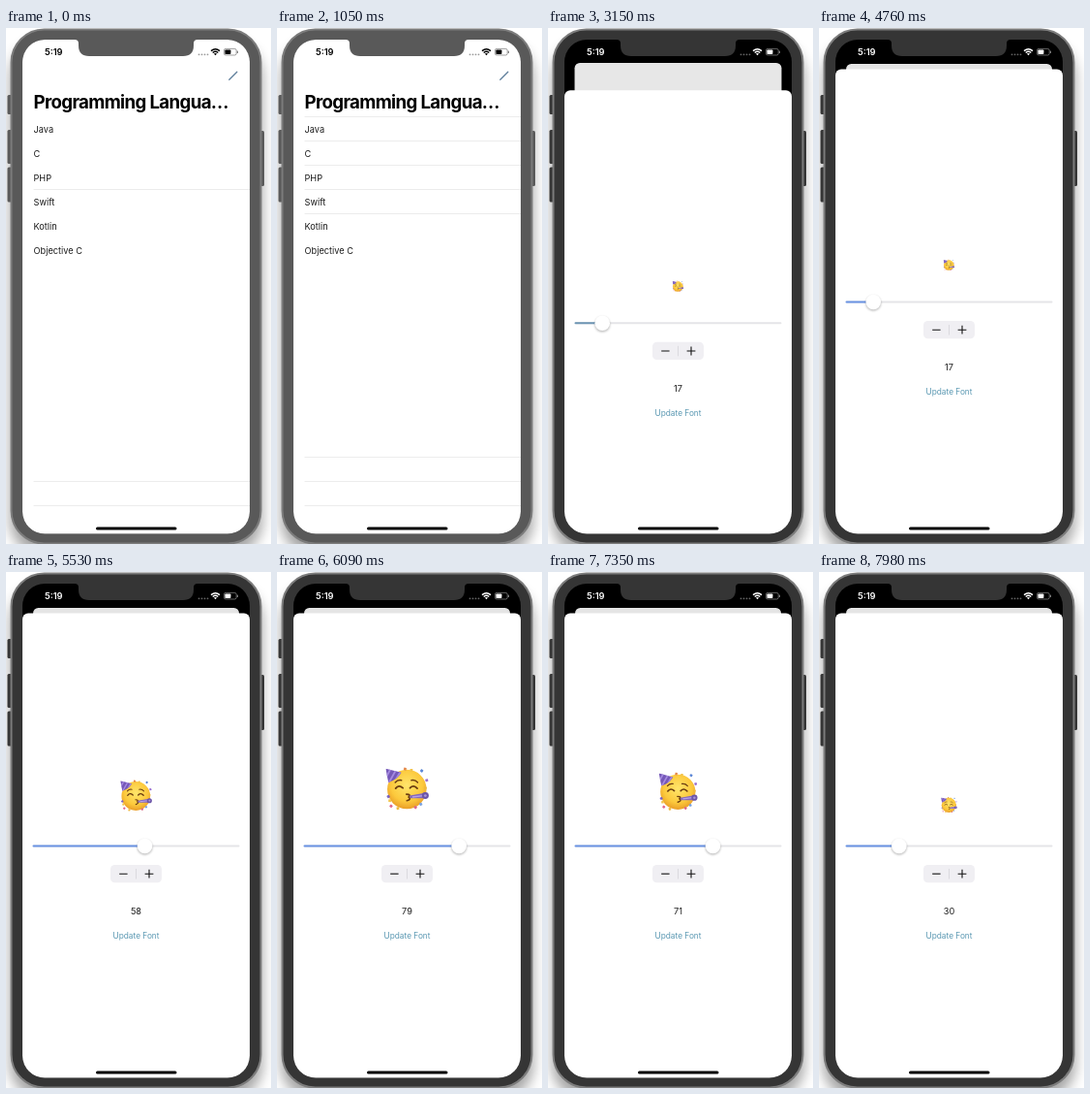
Animation of 274 by 532 pixels, one loop 8000 ms. Source, as an HTML page:

```html
<!DOCTYPE html>
<html lang="en">
<head>
<meta charset="utf-8">
<title>Font size sheet</title>
<style>
  html, body { margin: 0; height: 100%; overflow: hidden; background: #fff; }
  svg { display: block; width: 100vw; height: 100vh; font-family: Inter, Roboto, sans-serif; }
  .row { font-size: 9.2px; fill: #1c1c1c; }
  .title { font-size: 18.7px; font-weight: 700; letter-spacing: -.035em; }
  .clock { font-size: 9.3px; font-weight: 600; }
  .link { font-size: 8.3px; fill: #5a98b2; }
  .mid { text-anchor: middle; }
</style>
</head>
<body>
<svg viewBox="0 0 274 532">
  <defs>
    <clipPath id="screen"><rect x="17" y="12" width="235" height="509.500" rx="23"/></clipPath>
    <clipPath id="hatShape"><path d="M3 5L38 14Q28 30 9 36Z"/></clipPath>
    <radialGradient id="skin" cx=".5" cy=".4" r=".62">
      <stop offset="0" stop-color="#ffe56b"/><stop offset=".65" stop-color="#fcc93c"/><stop offset="1" stop-color="#e89a26"/>
    </radialGradient>
    <filter id="blur" x="-20%" y="-20%" width="140%" height="140%"><feGaussianBlur stdDeviation="7"/></filter>
    <filter id="soft" x="-50%" y="-50%" width="200%" height="200%"><feGaussianBlur stdDeviation="1.1"/></filter>
  </defs>

  <rect width="274" height="532" fill="#fff"/>
  <rect x="4" y="14" width="261" height="530" rx="36" fill="#000" opacity=".36" filter="url(#blur)"/>
  <g id="buttons">
    <rect x="1.500" y="69" width="5" height="20" rx="1.500"/>
    <rect x="1.500" y="105" width="5" height="35" rx="1.500"/>
    <rect x="1.500" y="143.500" width="5" height="36" rx="1.500"/>
    <rect x="262" y="106" width="5" height="57" rx="1.500"/>
  </g>
  <rect id="bezel" x="5.500" y="1.500" width="258" height="530" rx="34" stroke="#7c7c7c" stroke-width="2"/>

  <g clip-path="url(#screen)">
    <rect x="17" y="12" width="235" height="510"/>
    <g id="list">
      <rect id="card" x="17" y="12" width="235" height="520" fill="#fff"/>
      <path id="pen" d="M230.800 53.200L238.800 45.200" stroke-width="1.300" stroke-linecap="round"/>
      <text class="title" x="28.500" y="82.500">Programming Langua…</text>
      <g id="rows"></g>
      <rect id="dim" x="17" y="12" width="235" height="520"/>
    </g>
    <g id="sheet">
      <rect x="17" y="42.500" width="235" height="520" rx="6" fill="#fff"/>
      <g id="emoji">
        <circle cx="50" cy="51" r="43.500" fill="url(#skin)"/>
        <g clip-path="url(#hatShape)">
          <rect width="42" height="40" fill="#7558b8"/>
          <path d="M4 24L15 4M9 38L27 6M20 38L37 10" stroke="#a58ae0" stroke-width="4"/>
        </g>
        <g fill="none" stroke="#6b3d10" stroke-width="4" stroke-linecap="round">
          <path d="M25 49Q32 40 41 48M57 48Q65 40 73 49"/>
          <path d="M24 36Q30 29 38 31M60 31Q68 29 74 36" stroke-width="3"/>
          <path d="M49 62Q60 62 54 68Q61 73 50 76" stroke-width="3.500"/>
        </g>
        <path d="M56 65L90 59L91 71L57 71Z" fill="#8468bd"/>
        <path d="M62 68L86 65" stroke="#b8a2e6" stroke-width="3"/>
        <circle cx="91" cy="65" r="7.500" fill="#6c56a8"/>
        <circle cx="91" cy="65" r="3" fill="#a794d6"/>
        <g id="confetti"></g>
      </g>
      <path d="M28.500 282.500H240.500" stroke="#e5e5e8" stroke-width="2" stroke-linecap="round"/>
      <path id="fill" stroke-width="2" stroke-linecap="round"/>
      <g id="thumb">
        <circle cy="1.200" r="8" opacity=".25" filter="url(#soft)"/>
        <circle r="7.800" fill="#fff"/>
      </g>
      <rect x="108" y="302" width="53" height="18.300" rx="4.500" fill="#f0eff3"/>
      <path d="M134.500 306V316.500" stroke="#d6d5da" stroke-width=".8"/>
      <path d="M117.200 311.200H125.600" stroke="#111" stroke-width="1.100"/>
      <path id="plus" d="M143.600 311.200H152.400M148 306.800V315.600" stroke-width="1.100"/>
      <text id="value" class="row mid" x="134.500" y="352.800"></text>
      <text class="link mid" x="134.500" y="377.800">Update Font</text>
    </g>
    <g id="status">
      <text class="clock" x="40" y="28.200">5:19</text>
      <g opacity=".4">
        <circle cx="199.500" cy="27.300" r=".9"/><circle cx="202.500" cy="27.300" r=".9"/>
        <circle cx="205.500" cy="27.300" r=".9"/><circle cx="208.500" cy="27.300" r=".9"/>
      </g>
      <g fill="none" stroke="currentColor" stroke-width="1.400">
        <path d="M212 23.600Q216.500 19.700 221 23.600M213.700 25.500Q216.500 23.100 219.300 25.500"/>
      </g>
      <path d="M214.900 26.500Q216.500 25.300 218.100 26.500L216.500 28.200Z"/>
      <rect x="225.400" y="21.400" width="12.800" height="6.600" rx="1.800" fill="none" stroke="currentColor" stroke-width=".7" opacity=".55"/>
      <rect x="226.400" y="22.400" width="6" height="4.600" rx=".8"/>
      <rect x="238.900" y="23.500" width="1" height="2.400" rx=".5" opacity=".55"/>
    </g>
    <rect x="93" y="514.500" width="83.500" height="3" rx="1.500"/>
  </g>
  <path id="notch" d="M71 11H198V12Q194 12 194 16V18Q194 29 183 29H86Q75 29 75 18V16Q75 12 71 12Z"/>
</svg>

<script>
const LOOP = 8000, STEP = 70;
const PRESS = 2730, RISE = 2780, SETTLED = 3430;
const LANGS = ["Java", "C", "PHP", "Swift", "Kotlin", "Objective C"];
const LINES = [91.5, 116.5, 141.5, 166.5, 191.5, 442.5, 467.5, 492.5];
const EARLY = [166.5, 467.5, 492.5];
// time, font size
const SIZES = [[4830, 17], [4970, 22], [5530, 58], [5670, 62], [5740, 63.5],
  [6510, 97.5], [6650, 100], [6790, 100], [7630, 56], [7980, 29.5]];
// x, y, colour
const CONFETTI = [[60, 9, "#f3c34a"], [83, 10, "#5b86d6"], [94, 31, "#9a6fd0"],
  [91, 48, "#f0b93e"], [9, 67, "#7a63c0"], [12, 76, "#f2c64e"], [15, 88, "#e0688c"],
  [30, 93, "#f0b93e"], [69, 91, "#d9668a"], [81, 84, "#7aa2e0"], [46, 6, "#e58a4c"]];

const $ = id => document.getElementById(id);
const set = (id, attrs) => {
  for (const key in attrs) $(id).setAttribute(key, attrs[key]);
};

$("rows").innerHTML =
  LINES.map(y => `<path class="${EARLY.includes(y) ? "" : "late"}" d="M28.500 ${y}H252" stroke="#ececec"/>`).join("") +
  LANGS.map((name, i) => `<text class="row" x="28.500" y="${107.5 + 25 * i}">${name}</text>`).join("");
$("confetti").innerHTML = CONFETTI.map(([x, y, color], i) =>
  `<rect x="${x - 3}" y="${y - 3}" width="6" height="6" rx="1" fill="${color}" transform="rotate(${i * 37} ${x} ${y})"/>`).join("");
const late = document.querySelectorAll(".late");

function sizeAt(t) {
  if (t <= SIZES[0][0]) return SIZES[0][1];
  for (let i = 1; i < SIZES.length; i++) {
    const [t0, a] = SIZES[i - 1], [t1, b] = SIZES[i];
    if (t <= t1) return a + (b - a) * (t - t0) / (t1 - t0);
  }
  return SIZES[SIZES.length - 1][1];
}

// Critically damped spring: remaining distance from 1 to 0
function remaining(t) {
  const x = Math.max(0, t - RISE) * 0.0132;
  return t >= SETTLED ? 0 : (1 + x) * Math.exp(-x);
}

function drawPhone(t) {
  const dark = t >= PRESS ? "#353535" : "#595959";
  for (const id of ["bezel", "notch", "buttons"]) set(id, { fill: dark });
  set("pen", { stroke: t >= PRESS ? "#dcdcdc" : "#5f7f9c" });
  const fade = Math.min(1, t / 630);
  late.forEach(line => { line.style.opacity = fade; });
}

function drawTransition(t) {
  const left = remaining(t), p = 1 - left;
  const scale = 1 - 0.094 * p;
  const color = p > 0.3 ? "#fff" : "#000";
  set("sheet", { transform: `translate(0 ${490 * left})` });
  set("list", { transform: `translate(${134.5 * (1 - scale)} ${12 + 25 * p - 12 * scale}) scale(${scale})` });
  set("card", { rx: p > 0 ? 6 : 0 });
  set("dim", { rx: p > 0 ? 6 : 0, opacity: 0.1 * p });
  set("status", { fill: color, color });
}

function drawControls(t) {
  const size = sizeAt(t), x = 20 + 2.13 * size;
  const width = 0.59 * size + 0.3 * Math.max(0, 24 - size);
  const y = 250.2 - 0.337 * size;
  set("emoji", { transform: `translate(${134.3 - width / 2} ${y - width / 2}) scale(${width / 100})` });
  set("fill", { d: `M28.500 282.500H${x}`, stroke: t < SETTLED ? "#6d95b4" : "#6b94e4" });
  set("thumb", { transform: `translate(${x} 282.500)` });
  set("plus", { stroke: size >= 100 ? "#a3a2a8" : "#111" });
  $("value").textContent = Math.round(size);
}

function frame() {
  const t = Math.floor(performance.now() % LOOP / STEP) * STEP;
  drawPhone(t);
  drawTransition(t);
  drawControls(t);
  requestAnimationFrame(frame);
}
frame();
</script>
</body>
</html>
```
